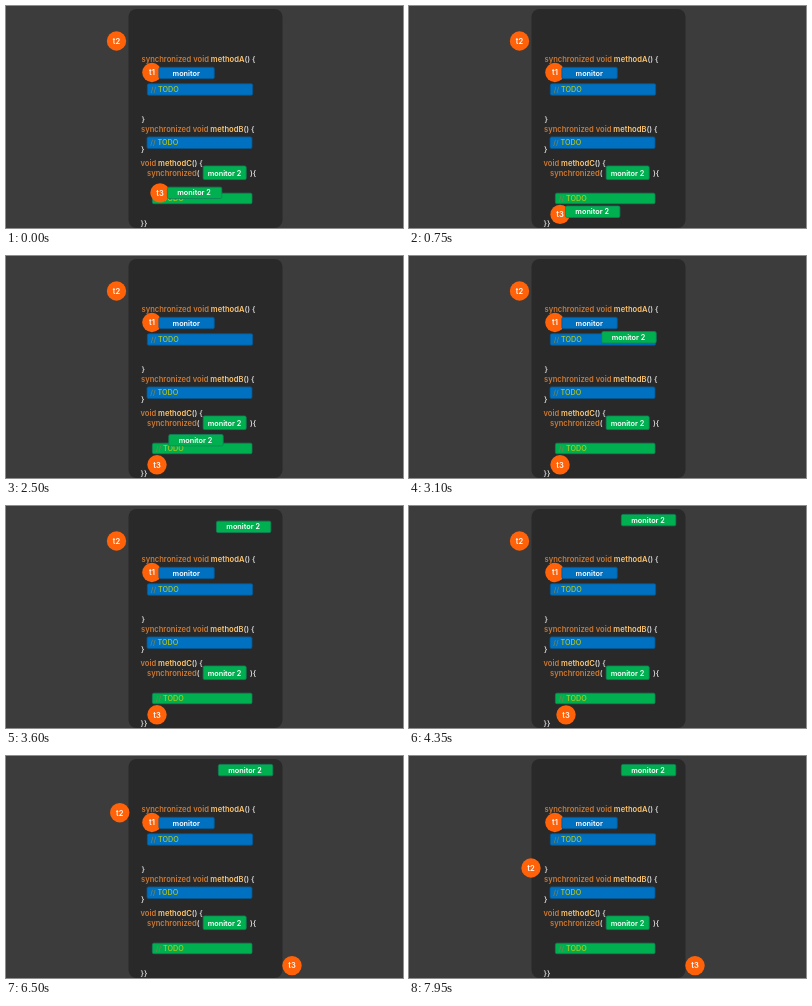
Write an HTML page that moves like this. It is 397 by 222 pixels and loops after 8 s.

```html
<!DOCTYPE html>
<html lang="en">
<head>
<meta charset="utf-8">
<title>Monitors</title>
<style>
  html, body { margin: 0; width: 100%; height: 100%; overflow: hidden; background: #3c3c3c; }
  svg { display: block; width: 100vw; height: 100vh; }
  text { font: 600 7.6px Inter, "Liberation Sans", sans-serif; fill: #d6d6d6; white-space: pre; }
  .kw { fill: #cc7832; }
  .fn { fill: #ffc66d; }
  .todo { font-size: 7.2px; font-weight: 500; fill: #b5c81e; }
  .slash { fill: #7d8450; }
  .label { font-size: 7.3px; fill: #fff; text-anchor: middle; }
  .name { font-size: 7.6px; fill: #fff; text-anchor: middle; }
</style>
</head>
<body>
<svg viewBox="0 0 397 222">
  <rect x="122.5" y="3" width="154" height="219" rx="8" fill="#292929"/>
  <g id="code"></g>
  <g id="tasks"></g>
  <g id="threads"></g>
  <g id="locks"></g>
</svg>
<script>
const LOOP = 8000;
const BLUE = ['#0070c0', '#0a568c'], GREEN = ['#00b050', '#12805a'];
const layer = id => document.getElementById(id);

function add(id, markup) {
  const g = document.createElementNS('http://www.w3.org/2000/svg', 'g');
  g.innerHTML = markup;
  return layer(id).appendChild(g);
}

const kw = s => `<tspan class="kw">${s}</tspan>`;
const fn = s => `<tspan class="fn">${s}</tspan>`;
const line = (x, y, s) => add('code', `<text x="${x}" y="${y}">${s}</text>`);
const box = (x, y, w, h, [fill, stroke]) =>
  `<rect x="${x}" y="${y}" width="${w}" height="${h}" rx="1.5" fill="${fill}" stroke="${stroke}" stroke-width=".8"/>`;
const label = (x, y, s) => `<text class="label" x="${x}" y="${y}">${s}</text>`;

function todo(x, y, w, h, color, textX) {
  add('tasks', box(x, y, w, h, color) +
    `<text class="todo" x="${textX}" y="${y + h / 2 + 2.5}"><tspan class="slash">//</tspan> TODO</text>`);
}

function badge(name) {
  return add('threads',
    `<circle r="9.7" fill="#ff6208"/><text class="name" y="2.8">${name}</text>`);
}

line(135.5, 55.8, `${kw('synchronized void ')}${fn('methodA')}() {`);
line(135.5, 116, '}');
line(135, 126.2, `${kw('synchronized void ')}${fn('methodB')}() {`);
line(135, 146, '}');
line(134.5, 159.8, `${kw('void ')}${fn('methodC')}() {`);
line(141, 169.8, `${kw('synchronized')}(`);
line(244, 169.8, '){');
line(134.5, 219.5, '}}');

todo(141.3, 77.8, 105.4, 11.4, BLUE, 144.8);
todo(141, 130.9, 105, 11.6, BLUE, 144.3);
todo(146.4, 187.2, 99.6, 10.5, GREEN, 149.8);
add('locks', box(152.9, 61.3, 55.4, 11.4, BLUE) + label(180.2, 69.6, 'monitor'));
add('locks', box(197.2, 160, 43, 13.6, GREEN) + label(218.5, 169.5, 'monitor 2'));

const lock = add('locks', box(.4, .4, 54.4, 11.4, GREEN) + label(27.1, 8.7, 'monitor 2'));
const t1 = badge('t1'), t2 = badge('t2'), t3 = badge('t3');

const clamp = u => Math.max(0, Math.min(1, u));
const smooth = u => u < .5 ? 2 * u * u : 1 - 2 * (1 - u) ** 2;
const slowDown = u => 1 - (1 - u) ** 2;

// Each leg is [start, duration, dx, dy, ease], added to the starting point.
function place(node, t, [x, y], legs = []) {
  for (const [start, duration, dx, dy, ease = smooth] of legs) {
    const k = ease(clamp((t - start) / duration));
    x += dx * k;
    y += dy * k;
  }
  node.setAttribute('transform', `translate(${x} ${y})`);
}

function draw(t) {
  place(t1, t, [145.9, 66.5]);
  place(t2, t, [110.5, 35], [[5900, 1600, 11.5, 77]]);
  place(t3, t, [154, 186.8], [[0, 870, -3, 22, slowDown], [4090, 1750, 135, .8]]);
  place(lock, t, [161, 180.7], [[0, 870, -5, 19.3, slowDown], [2083, 1750, 56, -192]]);
  lock.setAttribute('opacity', .52 + .48 * clamp(Math.abs(t - 1750) / 250));
}

const begin = performance.now();
function tick() {
  draw((performance.now() - begin) % LOOP);
  requestAnimationFrame(tick);
}
tick();
</script>
</body>
</html>
```
